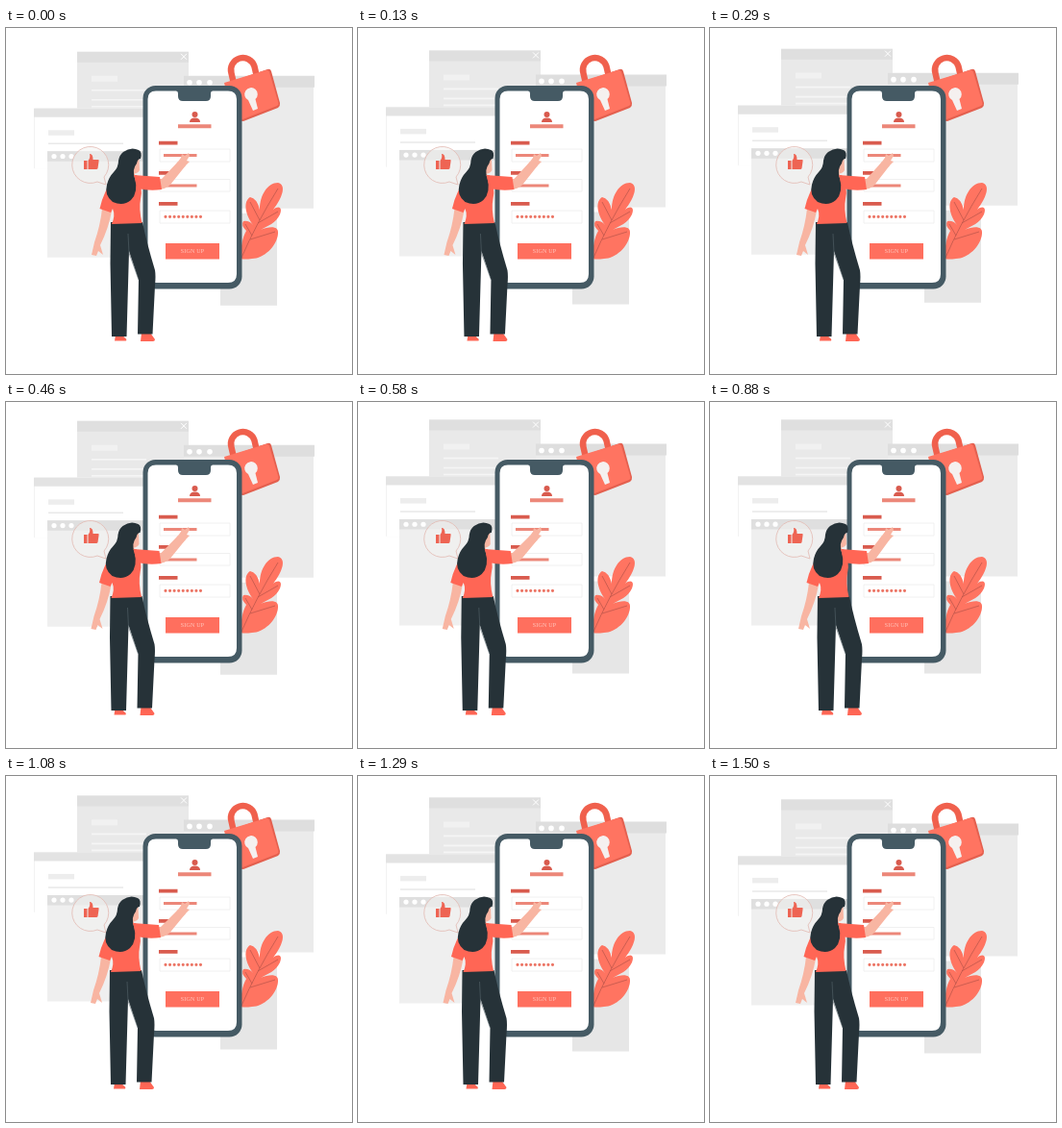
Animation of 360x360 px, one loop 1540 ms. Source, as an HTML page:

```html
<!DOCTYPE html>
<html>
<head>
<meta charset="utf-8">
<style>
html, body { margin: 0; width: 100%; height: 100%; overflow: hidden; background: #fff; }
svg { display: block; width: 100vw; height: 100vh; }
</style>
</head>
<body>
<svg viewBox="0 0 360 360">
  <g id="windows">
    <g id="top">
      <path fill="#e9e9e9" d="M74 17H190V84H74z"/>
      <path fill="#dfdfdf" d="M74 17H190V28H74z"/>
      <path fill="#f1f1f1" d="M89 42H116V48H89z"/>
      <path stroke="#f5f5f5" stroke-width="1.6" d="M89 57H146M89 67H146M89 74H146"/>
      <path stroke="#fff" d="M182 19l6 6m0 -6l-6 6"/>
    </g>
    <g id="right">
      <path fill="#ebebeb" d="M185 43H320V180H185z"/>
      <path fill="#dedede" d="M185 42H321V54H185z"/>
      <g fill="#fff">
        <circle cx="191" cy="49" r="2.800"/>
        <circle cx="201" cy="49" r="2.800"/>
        <circle cx="212" cy="49" r="2.800"/>
      </g>
    </g>
    <path fill="#e6e6e6" d="M223 185H282V281H223z"/>
    <g id="left">
      <path fill="#fff" stroke="#ececec" stroke-width=".7" d="M29.500 76H150V121H43V138H29.500z"/>
      <path fill="#fff" d="M30 121H43V139H30z"/>
      <path fill="#e3e3e3" d="M29 76H150V85H29z"/>
      <path fill="#ededed" d="M44 98.500H71V104H44z"/>
      <path stroke="#e9e9e9" stroke-width="1.500" d="M44 112.500H122"/>
      <path fill="#efefef" d="M43 121H150V231H43z"/>
      <path fill="#dfdfdf" d="M43 120.500H150V131H43z"/>
      <g fill="#fff">
        <circle cx="50" cy="125.700" r="2.600"/>
        <circle cx="59" cy="125.700" r="2.600"/>
        <circle cx="68" cy="125.700" r="2.600"/>
      </g>
    </g>
  </g>

  <g id="bubble">
    <path fill="#f3f2f1" fill-opacity=".55" stroke="#e3b9b1" stroke-width=".8" d="M102 155L104 163L95 160A19 19 0 1 1 102 155"/>
    <path fill="#ee6453" d="M81 138h3.500v9H81zM85.500 138q2.500 -3 1.500 -7q3.500 -.5 3.500 6h5.500q1 0 .5 2l-1 7q-.3 1 -1.500 1h-8.500z"/>
  </g>

  <g id="lock">
    <path fill="none" stroke="#f0604d" stroke-width="6.500" d="M237 58L234.500 47A12.300 12.300 0 0 1 258.500 40L261 51"/>
    <path fill="#e4604f" d="M228 58L272 43Q275 42 276 45L285 78Q285.500 81 283 83L247 97L238 96z"/>
    <path fill="#ff7461" d="M227 57L270 44Q273 43 274 46L283.500 78Q284 80 282 81L245 95.500L236 92z"/>
    <path fill="#f5f0ef" d="M252 75A6.800 6.800 0 1 1 259.500 74L262 84L257 86z"/>
  </g>

  <g id="leaf">
    <path fill="#ff7461" d="M244 240C244 228 246 218 250 211Q244 205 247 201Q253 200 257 205C248 193 247 180 254 176Q261 177 264 189C264 174 272 161 283 161C292 163 288 176 278 189C284 184 288 187 285 194C281 203 272 206 265 210C275 206 284 206 283 214C282 227 268 240 256 240Q248 241 244 240z"/>
    <path fill="none" stroke="#b65449" stroke-width=".7" d="M245 239Q260 204 283 167M264 200L254 181M262 203L283 191M256 216L249 204M254 220L280 212"/>
  </g>

  <g id="phone">
    <rect x="142.500" y="60" width="103" height="211.500" rx="13" fill="#455a64"/>
    <path fill="#fff" d="M156 65.500H177Q179 65.500 179 68V71Q179 76 184 76H208Q213 76 213 71V68Q213 65.500 215 65.500H231Q240 65.500 240 74V256Q240 265 231 265H156Q147.500 265 147.500 256V74Q147.500 65.500 156 65.500z"/>
    <g fill="#d95b4e">
      <circle cx="196.500" cy="90" r="3"/>
      <path d="M191 98Q191 93.500 196.500 93.500T202 98z"/>
      <path d="M159 117.700h19.500v3.700H159zM159 149h19.500v3.700H159zM159 181h19.500v3.700H159z"/>
    </g>
    <path fill="none" stroke="#ececec" stroke-width=".8" d="M160 126H233V139H160zM160 157.500H233V170H160zM160 190H233V203H160z"/>
    <path fill="#ec8779" d="M179 100.300h34.500v4H179zM164 131h34.500v3H164zM164 162.500h34.500v3H164z"/>
    <path stroke="#ec7565" stroke-width="3.200" stroke-linecap="round" stroke-dasharray="0 4.560" d="M166 196.300H203"/>
    <path fill="#ff6f5e" d="M166 224H222V240.500H166z"/>
    <text x="194" y="234.300" text-anchor="middle" font-family="Liberation Serif, serif" font-size="6" letter-spacing=".2" fill="#ffc9c0">SIGN UP</text>
  </g>

  <g id="woman">
    <path fill="#f8b5a2" d="M100 188L110 190Q107 208 98 226L101 236L96 232L94 237L89 236L92 223Q98 206 100 188z"/>
    <path fill="#ff6655" d="M114 319h6l5 4.500q1 2 -1 2H113zM141 317h9l5 7q0 2 -2 2H140z"/>
    <path fill="#263238" d="M109 202H142Q146 222 155 252Q156 258 155 268L152.500 318.500H137L138 262L128 232L125.500 321H110L108.500 245z"/>
    <path fill="none" stroke="#56656c" stroke-width=".6" d="M127 214L128 234L138 262"/>
    <path fill="#ff6655" d="M113 156L136 153Q143 166 140 178Q138 188 141.500 203L110 204Q114 195 111 188L109 192L97.500 188Q102 168 113 156z"/>
    <path fill="#f8b5a2" d="M131 136H138.500L139 148Q137 152 134 151V156H127z"/>
    <path fill="#263238" d="M122 129Q130 123 138 127Q142 129 140 136Q137 136 136 141Q131 147 134 156Q138 171 130 179Q122 186 111 181Q102 174 105 163Q107 155 112 150Q117 145 117 138Q118 132 122 129z"/>
  </g>
  <path id="forearm" fill="#f8b5a2"/>
  <path fill="#f8b5a2" d="M176 143L182 135L183 131L186 133L190 130L191 133L188 138L191 139L183 147z"/>
  <path id="sleeve" fill="#ff6655"/>
</svg>
<script>
const LOOP = 1540, PEAK = 725;
const SWAY = [[0, 0], [290, 1], [460, -0.5], [710, -2], [880, 3], [1080, -1], [1500, 0], [LOOP, 0]];
const el = id => document.getElementById(id);

function along(keys, t) {
  const i = keys.findIndex(k => k[0] > t);
  const [t0, a] = keys[i - 1], [t1, b] = keys[i];
  return a + (b - a) * (t - t0) / (t1 - t0);
}

function draw(now) {
  const t = now % LOOP;
  const drop = 7.8 * (t < PEAK ? 1 - t / PEAK : (t - PEAK) / (LOOP - PEAK));
  const dx = along(SWAY, t);
  el('windows').setAttribute('transform', `translate(0 ${drop})`);
  el('woman').setAttribute('transform', `translate(${dx} 0)`);
  // The hand stays on the screen while the shoulder sways.
  el('forearm').setAttribute('d', `M${158 + dx} 157H${162 + dx}L179 139L187 143L${171 + dx / 2} 163Q${166 + dx} 168 ${158 + dx} 168z`);
  el('sleeve').setAttribute('d', `M${133 + dx} 153L${160 + dx} 155L${162 + dx} 168Q${150 + dx} 170 ${137 + dx} 167z`);
}

const start = performance.now();
function tick() {
  draw(performance.now() - start);
  requestAnimationFrame(tick);
}
draw(0);
tick();
</script>
</body>
</html>
```
